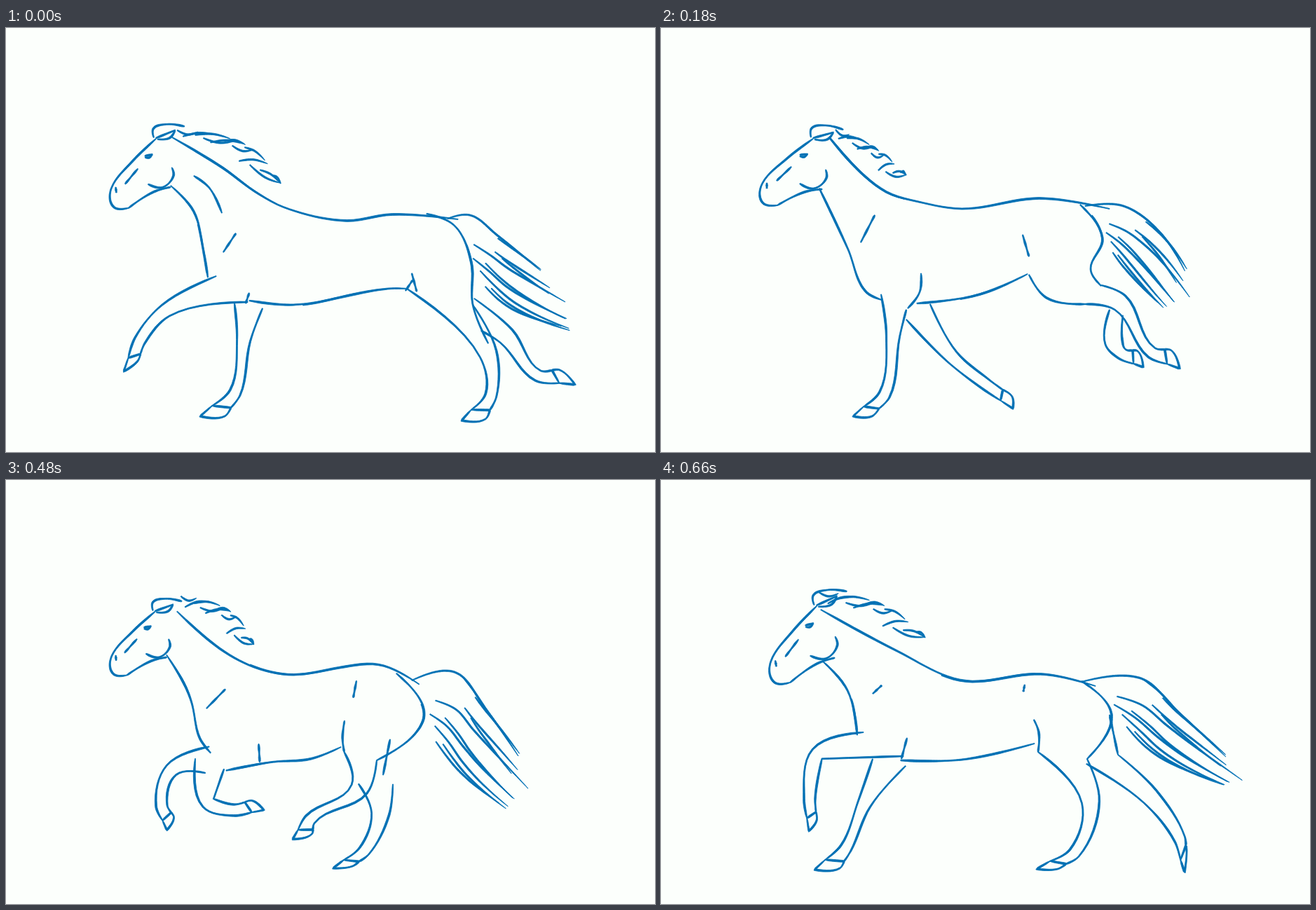
Write an HTML page that moves like this. It is 926 by 605 pixels and loops after 0.72 s.

```html
<!DOCTYPE html>
<html lang="en">
<head>
<meta charset="utf-8">
<title>Galloping horse</title>
<style>
html, body { margin: 0; width: 100%; height: 100%; overflow: hidden; background: #fcfffc; }
svg { display: block; width: 926px; height: 605px; }
path { fill: #0070b4; stroke: #0070b4; stroke-width: .8; stroke-linejoin: round; }
</style>
</head>
<body>
<svg viewBox="0 0 926 605"><path id="ink"/></svg>
<script>
const lerp = (a, b, k) => a + (b - a) * k;
const mix = (p, q, k) => [lerp(p[0], q[0], k), lerp(p[1], q[1], k)];
const shift = (p, v, r) => [p[0] + v[0] * r, p[1] + v[1] * r];
const rand = n => { const v = Math.sin(n * 127.1 + 3.7) * 43758.5; return v - Math.floor(v); };
const unit = (a, b) => {
  const x = b[0] - a[0], y = b[1] - a[1], l = Math.hypot(x, y) || 1;
  return [x / l, y / l];
};
const parse = s => s.split('/').map(t => t.split(' ').map(p => p.split(',').map(Number)));

// Direction at point i, or null at ends and sharp corners.
function tangent(pts, i) {
  if (!i || i === pts.length - 1) return null;
  const u = unit(pts[i - 1], pts[i]), v = unit(pts[i], pts[i + 1]);
  return u[0] * v[0] + u[1] * v[1] < .2 ? null : unit([0, 0], [u[0] + v[0], u[1] + v[1]]);
}

function curve(pts) {
  const out = [pts[0]];
  for (let i = 0; i < pts.length - 1; i++) {
    const a = pts[i], d = pts[i + 1], l = Math.hypot(d[0] - a[0], d[1] - a[1]) / 3;
    const u = tangent(pts, i), v = tangent(pts, i + 1);
    let b = u && shift(a, u, l), c = v && shift(d, v, -l);
    b = b || mix(a, c || d, 1 / 3);
    c = c || mix(d, b, 1 / 3);
    for (let k = 1; k <= 8; k++) {
      const t = k / 8, m = mix(b, c, t);
      out.push(mix(mix(mix(a, b, t), m, t), mix(m, mix(c, d, t), t), t));
    }
  }
  return out;
}

// Evenly spaced points along a polyline.
function spread(pts, n = 48) {
  const len = [0];
  for (let i = 1; i < pts.length; i++) {
    len.push(len[i - 1] + Math.hypot(pts[i][0] - pts[i - 1][0], pts[i][1] - pts[i - 1][1]));
  }
  const out = [];
  for (let i = 0, j = 1; i < n; i++) {
    const at = len[len.length - 1] * i / (n - 1);
    while (j < pts.length - 1 && len[j] < at) j++;
    out.push(mix(pts[j - 1], pts[j], (at - len[j - 1]) / (len[j] - len[j - 1] || 1)));
  }
  return out;
}
const smooth = pts => spread(curve(pts));
const along = (line, t) => {
  const x = Math.max(0, Math.min(1, t)) * (line.length - 1), i = Math.min(line.length - 2, Math.floor(x));
  return mix(line[i], line[i + 1], x - i);
};

const poses = [];
// head: poll and chin; body: spine, rump, throat, belly, flank, elbow, shoulder, hip, extras;
// legs: upper front, upper back, joint, fetlock, toe, heel; hair: mane edge, tail top, tail underside
function addPose(head, body, legs, hair) {
  poses.push({ head: parse(head), body: parse(body).map(smooth), legs: parse(legs), hair: parse(hair) });
}

addPose('214,158 156,257',
  '237,156 310,200 356,234 397,256 485,275 550,266 645,273/600,265 640,282 664,335 666,395 688,450/235,225 268,262 282,320 288,356/347,389 410,395 545,372 574,372/579,350 586,376/347,378 342,393/328,293 310,320/570,375 580,360/268,211 290,228 308,264',
  '300,354 345,391 228,403 191,446 168,490 188,475/326,393 366,400 339,446 327,520 277,554 312,554/572,372 666,395 688,465 692,524 650,560 684,558/678,432 668,386 714,440 759,496 812,509 790,488',
  '245,145 350,171 392,222/630,272 662,267 700,295 779,360/664,345 715,397 800,427');

addPose('217,154 147,251',
  '237,154 282,202 330,234 452,263 550,246 640,260/632,259 649,300 645,350 650,382/224,231 272,310 275,350 286,377/333,390 392,393 470,386 541,358/553,362 565,390 633,402/336,372 331,392/323,267 292,299/530,266 540,282',
  '286,377 331,394 258,461 225,525 185,564 208,554/338,390 394,399 419,470 444,522 410,558 440,554/547,355 686,386 700,462 728,496 777,516 766,496/650,385 692,380 705,430 728,462 770,472 761,455',
  '235,140 298,160 352,206/632,260 700,256 742,315 815,412/650,297 695,368 776,420');

addPose('217,158 147,251',
  '241,158 318,232 372,249 430,258 540,243 640,258/598,252 630,300 613,345 628,368/226,229 267,316 292,376 315,388/365,393 455,380 523,351/525,352 550,385 605,394/371,350 369,377 352,400/305,267 285,306/516,295 525,326',
  '314,380 350,402 331,440 319,523 274,554 301,554/350,416 384,394 415,469 463,508 502,543 501,526/605,394 628,367 655,392 700,463 740,486 728,460/640,402 659,410 646,448 658,465 688,484 680,461',
  '250,144 303,170 350,210/605,254 660,254 715,295 758,369/632,300 655,335 713,396');

addPose('215,160 143,251',
  '240,165 308,245 375,264 430,258 517,237 582,252/565,250 597,297 570,350 567,356/225,235 256,317 275,382 300,395/362,392 435,377 480,351/475,351 488,357 505,375/361,365 363,395/298,274 276,315/506,268 491,318',
  '310,396 363,395 387,467 430,520 415,563 445,561/310,400 341,427 312,463 372,472 420,467 405,450/500,374 567,356 603,388 579,450 593,485 594,460/505,375 553,383 553,418 504,460 499,513 515,480',
  '250,143 316,175 352,228/567,251 615,242 662,285 718,342/601,303 640,355 715,430');

addPose('218,185 154,269',
  '250,188 312,253 370,275 470,264 516,262 572,290/562,287 577,330 572,352 518,400/228,247 260,325 275,380 305,396/360,405 435,390 463,374/459,351 463,373 475,388/361,378 360,403/309,302 279,331/480,283 465,317/474,390 475,434',
  '300,380 358,402 315,474 370,480 413,472 392,460/271,386 307,412 238,408 252,461 286,485 284,461/475,388 518,400 513,430 448,461 432,492 452,482/465,465 503,460 454,492 428,514 390,542 412,535',
  '260,165 326,194 354,248/562,287 620,270 655,330 728,441/572,362 620,428 695,490');

addPose('207,191 156,287',
  '238,187 320,243 375,270 420,281 550,265 607,293/552,265 610,305 619,330 602,363 540,400/230,252 262,290 272,320 279,383/268,424 360,406 430,407 493,388/507,336 497,365 490,388/360,375 364,402/317,295 293,321/520,290 526,304/622,350 601,408',
  '240,415 264,423 262,447 280,462 323,470 310,455/309,375 262,424 234,420 192,468 173,514 195,502/490,388 540,400 495,452 420,508 386,533 421,528/541,402 601,408 614,462 594,545 543,566 577,567',
  '240,163 320,185 353,222/596,285 660,278 708,315 765,395/620,332 675,405 725,441');

addPose('222,180 164,290',
  '228,185 335,243 430,286 545,277 620,294/600,287 643,335 608,398/230,258 266,300 280,364/342,400 430,399 533,376/532,342 539,360 538,388/351,368 343,398/315,293 302,305/519,292 517,302/640,335 652,392',
  '289,360 346,394 223,391 212,455 211,501 222,486/302,398 349,408 290,462 264,525 219,556 255,554/538,388 608,398 613,460 590,532 536,555 566,555/607,405 652,392 698,452 740,512 747,560 750,530',
  '225,158 320,180 377,225/600,288 685,283 735,328 830,418/642,322 700,388 800,432');

// Head in its own place: face, jaw, cheek, eye, nostril, line, ear, forelock.
const HEAD = parse('217,158 180,186 145,221 141,240 147,251 166,253/166,253 205,234 230,230/235,202 236,214 218,229 198,222/198,181 209,180 204,184 198,183/151,221 151,229/186,198 165,218/217,157 246,149 237,159 219,159/214,156 215,143 235,139 260,145');
const POLL = [217, 158], CHIN = [147, 251];

function placeHead([poll, chin]) {
  const ux = CHIN[0] - POLL[0], uy = CHIN[1] - POLL[1], vx = chin[0] - poll[0], vy = chin[1] - poll[1];
  const q = ux * ux + uy * uy, c = (ux * vx + uy * vy) / q, s = (ux * vy - uy * vx) / q;
  return HEAD.map(line => line.map(([x, y]) => {
    x -= POLL[0];
    y -= POLL[1];
    return [poll[0] + x * c - y * s, poll[1] + x * s + y * c];
  }));
}

// Both edges and the hoof of a leg, offset from its joints.
function leg([front, back, joint, fetlock, toe, heel], jointWidth) {
  const top = mix(front, back, .5), foot = mix(toe, heel, .5);
  const side = (a, b, c) => {
    const u = unit(a, b), v = unit(b, c);
    return unit([0, 0], [-u[1] - v[1], u[0] + v[0]]);
  };
  const n = side(top, joint, fetlock), m = side(joint, fetlock, foot);
  const fetF = shift(fetlock, m, 8), fetB = shift(fetlock, m, -8);
  const cuffF = mix(toe, fetF, .4), cuffB = mix(heel, fetB, .4);
  return [
    [front, shift(joint, n, jointWidth / 2), fetF, cuffF],
    [back, shift(joint, n, -jointWidth / 2), fetB, cuffB],
    [cuffF, toe, heel, cuffB, cuffF]
  ];
}

function mane(edge, spine) {
  const top = smooth(edge), locks = [];
  for (let i = 0; i < 12; i++) {
    const u = i / 12, r = rand(i), tip = along(top, u + .14 + .16 * r);
    const root = mix(along(spine, u * .3), along(top, u), .45 + .5 * rand(i + 20));
    const mid = mix(root, tip, .5);
    locks.push([root, [mid[0], mid[1] + (i % 3 ? -4 : 5)], tip]);
  }
  return locks;
}

function tail(upper, lower) {
  const a = smooth(upper), b = smooth(lower), out = [a.slice(0, 38)];
  for (let i = 0; i < 10; i++) {
    const v = i / 9, from = .3 * rand(i + 40) + .2 * v, to = .82 + .18 * rand(i + 60), hair = [];
    for (let k = 0; k <= 5; k++) {
      const t = lerp(from, to, k / 5), w = v + (rand(i + 80) - .5) * .5 * t * (v > 0 && v < 1);
      const p = mix(along(b, t), along(a, t), w);
      hair.push(shift(p, [.85, .5], 18 * t * t * 4 * v * (1 - v)));
    }
    out.push(hair);
  }
  return out;
}

const pen = (s, seed) => 1.2 * Math.min(1, .5 + 8 * s, .5 + 8 * (1 - s)) * (1 + .22 * Math.sin(s * 11 + seed * 2.3));
const wisp = s => 1.25 * Math.pow(Math.sin(Math.PI * (.14 + .85 * s)), .7);

// Closed outline of a stroke with changing width.
function brush(pts, seed, width) {
  const left = [], right = [], last = pts.length - 1;
  pts.forEach((p, i) => {
    const [x, y] = unit(pts[Math.max(0, i - 1)], pts[Math.min(last, i + 1)]);
    const r = width(i / last, seed);
    left.push(shift(p, [-y, x], r).map(v => v.toFixed(1)).join(' '));
    right.unshift(shift(p, [y, -x], r).map(v => v.toFixed(1)).join(' '));
  });
  return 'M' + left.concat(right).join('L') + 'Z';
}

// A second, slightly skewed pass over part of a line.
function retrace(pts, seed) {
  const n = pts.length, from = Math.floor(n * .6 * rand(seed));
  const part = pts.slice(from, from + Math.floor(n * .3) + 2), turn = 4 * rand(seed + 9) - 2;
  return part.map((p, i) => shift(p, [.6, -.8], turn * (2 * i / part.length - 1)));
}

const blend = (a, b, k) => a.slice(0, b.length).map((line, i) => line.map((p, j) => mix(p, b[i][j], k)));

function drawing(key) {
  const a = poses[Math.floor(key)], b = poses[Math.ceil(key)], now = {};
  for (const part in a) now[part] = key % 1 ? blend(a[part], b[part], key % 1) : a[part];
  const limbs = now.legs.flatMap((l, i) => leg(l, i < 2 ? 19 : 25));
  let d = '';
  placeHead(now.head[0]).concat(limbs).forEach((line, i) => { d += brush(curve(line), i, pen); });
  now.body.forEach((line, i) => {
    d += brush(line, i, pen);
    if (i < 4) d += brush(retrace(line, i + key * 3), i, wisp);
  });
  const [crest, top, under] = now.hair;
  mane(crest, now.body[0]).concat(tail(top, under)).forEach((line, i) => { d += brush(curve(line), i, wisp); });
  return d;
}

const STEP = 60;
const cels = [0, .5, 1, 2, 2.5, 3, 3.5, 4, 4.5, 5, 5.5, 6].map(drawing);
const ink = document.getElementById('ink');
let shown = -1;

function render(time) {
  const n = Math.floor(time / STEP) % cels.length;
  if (n !== shown) ink.setAttribute('d', cels[shown = n]);
}

function tick() {
  render(performance.now());
  requestAnimationFrame(tick);
}
tick();
</script>
</body>
</html>
```
